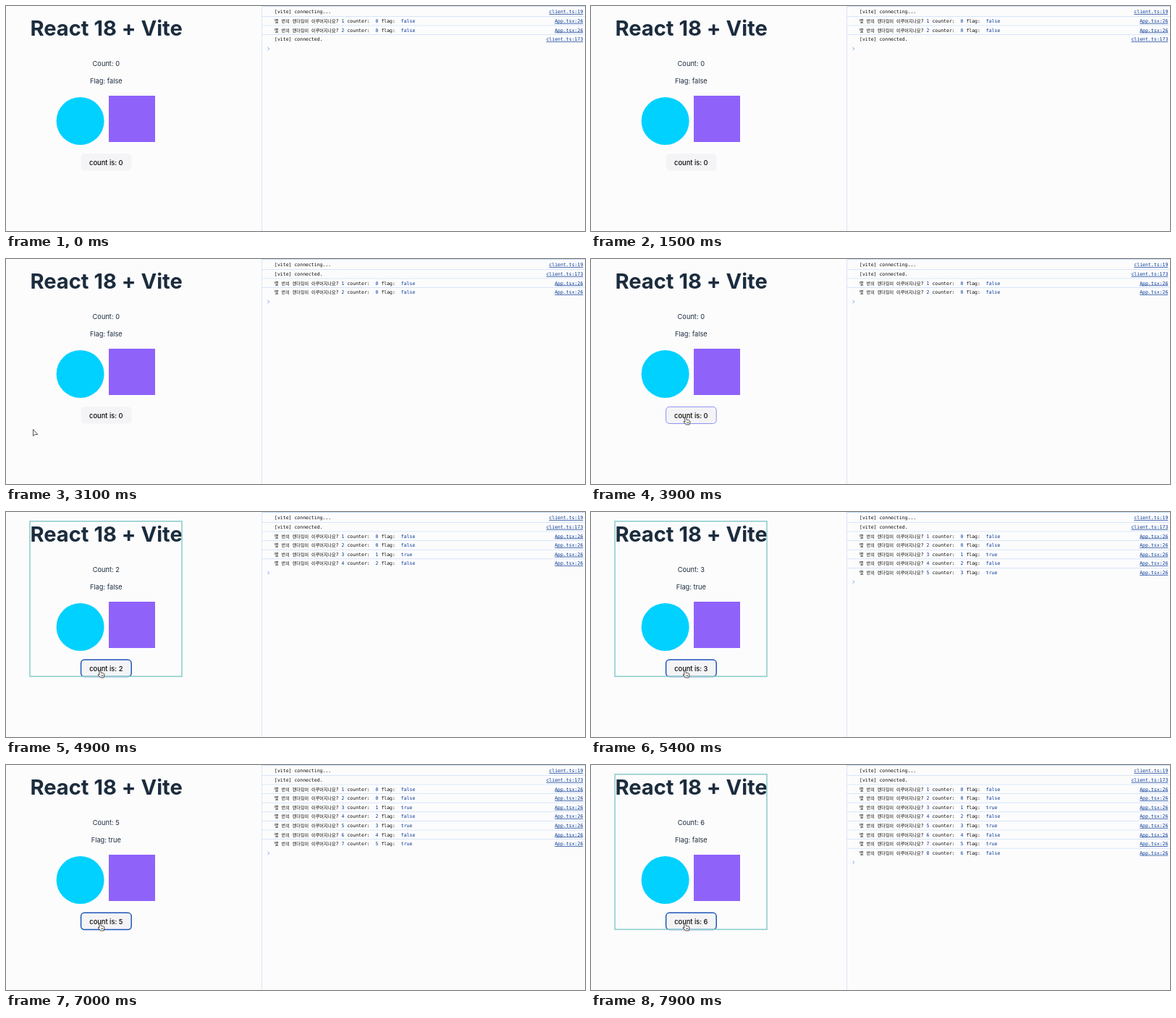
Write an HTML page with a canvas that moves like this. It is 800 by 311 pixels and loops after 8000 ms.

```html
<!DOCTYPE html>
<html lang="ko">
<head>
<meta charset="utf-8">
<title>Render counter</title>
<style>
  html, body { margin: 0; width: 100%; height: 100%; overflow: hidden; background: #fcfcfd; }
  canvas { display: block; width: 800px; height: 311px; }
</style>
</head>
<body>
<canvas id="stage"></canvas>
<script>
const W = 800, H = 311, LOOP = 8000;
const RELOAD = 2450, READY = 2600;
const CLICKS = [4200, 4900, 5250, 5600, 6300, 7900];
const FLASH = 290;
const CURSOR_IN = 2900, CURSOR_REST = 3800, NUDGE = 4700;

const UI = 'Inter, sans-serif';
const MONO = '6.5px "DejaVu Sans Mono", monospace';
const HANGUL = '6.1px "Noto Sans CJK KR", "Noto Sans CJK", sans-serif';
const INK = '#1b2c3d', LOG = '#0c0c0c', VALUE = '#063894', RULE = '#cfe0f8';
const ROW = 12.6, CELL = 3.913;

const canvas = document.getElementById('stage');
const dpr = window.devicePixelRatio || 1;
canvas.width = W * dpr;
canvas.height = H * dpr;
const ctx = canvas.getContext('2d');
ctx.scale(dpr, dpr);

function text(str, x, y, font, color, align = 'left') {
  ctx.font = font;
  ctx.fillStyle = color;
  ctx.textAlign = align;
  ctx.fillText(str, x, y);
}

function rect(x, y, w, h, color) {
  ctx.fillStyle = color;
  ctx.fillRect(x, y, w, h);
}

function link(str, y) {
  const w = str.length * CELL;
  text(str, 797.3, y, MONO, VALUE, 'right');
  rect(797.3 - w, y + 0.9, w, 0.7, VALUE);
}

function renderRow(n, counter, y) {
  let x = 371;
  for (const word of ['몇', '번의', '렌더링이', '이루어지나요']) {
    text(word, x, y, HANGUL, LOG);
    x += word.length * 5.62 + CELL;
  }
  text('?', x - CELL, y, MONO, LOG);
  const at = col => 463.6 + col * CELL;
  text(n, at(0), y, MONO, VALUE);
  text('counter:', at(2), y, MONO, LOG);
  text(counter, at(12), y, MONO, VALUE);
  text('flag:', at(14), y, MONO, LOG);
  text(counter % 2 === 1, at(21), y, MONO, VALUE);
  link('App.tsx:26', y);
}

function logRows(t, count) {
  const message = (str, src) => y => {
    text(str, 371, y, MONO, LOG);
    link(src, y);
  };
  const render = (n, counter) => y => renderRow(n, counter, y);
  const connecting = message('[vite] connecting...', 'client.ts:19');
  const connected = message('[vite] connected.', 'client.ts:173');
  const first = [render(1, 0), render(2, 0)];

  if (t < RELOAD) return [connecting, ...first, connected];
  if (t < READY) return [connecting];
  const rows = [connecting, connected, ...first];
  for (let i = 1; i <= count; i++) rows.push(render(i + 2, i));
  return rows;
}

function drawConsole(t, count) {
  rect(353, 0, 1, H, '#dbe5ef');
  rect(354, 0, W - 354, 1, '#c4dbf6');
  const rows = logRows(t, count);
  rows.forEach((row, i) => {
    if (i) rect(354, 1.4 + i * ROW, W - 354, 0.8, RULE);
    row(10.4 + i * ROW);
  });
  const y = 8.6 + rows.length * ROW;
  ctx.beginPath();
  ctx.moveTo(361.5, y - 2);
  ctx.lineTo(363.8, y);
  ctx.lineTo(361.5, y + 2);
  ctx.strokeStyle = '#6c9cec';
  ctx.lineWidth = 0.9;
  ctx.stroke();
}

function drawButton(y, count, hover) {
  ctx.beginPath();
  ctx.roundRect(103.6, y + 0.3, 69.6, 23.2, 4.7);
  ctx.fillStyle = '#f4f4f6';
  ctx.fill();
  if (count || hover) {
    ctx.strokeStyle = count ? '#1d55b8' : '#8187f2';
    ctx.lineWidth = count ? 1.5 : 0.9;
    ctx.stroke();
  }
  text('count is: ' + count, 138.3, y + 15.6, '500 9.3px ' + UI, '#080808', 'center');
}

function drawPage(t, count, hover) {
  const loading = t >= RELOAD && t < READY;
  text('React 18 + Vite', 138.6, 40.7, '700 29.1px ' + UI, INK, 'center');
  text('Count: ' + count, 138.3, 82.8, '9.25px ' + UI, INK, 'center');
  text('Flag: ' + (count % 2 === 1), 138.3, 106.7, '9.25px ' + UI, INK, 'center');
  if (!loading) {
    ctx.beginPath();
    ctx.arc(102.6, 159, 33, 0, Math.PI * 2);
    ctx.fillStyle = '#00d1ff';
    ctx.fill();
    rect(142, 124, 64, 64, '#8f62fa');
  }
  drawButton(loading ? 143 : 204, count, hover);

  if (CLICKS.some(c => t >= c && t < c + FLASH)) {
    ctx.strokeStyle = '#8acbc8';
    ctx.lineWidth = 1.5;
    ctx.strokeRect(33, 12.8, 210, 214.5);
  }
}

function drawHand() {
  ctx.beginPath();
  ctx.moveTo(-0.6, 6);
  ctx.lineTo(-1.2, 0.9);
  ctx.quadraticCurveTo(0, -0.9, 1, 0.8);
  ctx.lineTo(1.6, 3.6);
  ctx.quadraticCurveTo(4.2, 3, 6, 4.8);
  ctx.quadraticCurveTo(6.6, 7, 5.3, 10);
  ctx.lineTo(0.8, 10);
  ctx.quadraticCurveTo(-0.6, 7.8, -2.8, 6.2);
  ctx.quadraticCurveTo(-2.6, 4.6, -0.6, 6);
  ctx.closePath();
  for (const x of [2, 3.8]) {
    ctx.moveTo(x, 6.2);
    ctx.lineTo(x + 0.1, 8.4);
  }
}

function drawArrow() {
  ctx.beginPath();
  ctx.moveTo(0, 0);
  ctx.lineTo(0, 9);
  ctx.lineTo(2.2, 7.2);
  ctx.lineTo(6.2, 6.8);
  ctx.closePath();
}

function cursorAt(t) {
  const p = Math.min(1, Math.max(0, (t - CURSOR_IN) / (CURSOR_REST - CURSOR_IN)));
  const ease = p * p * (3 - 2 * p);
  const x = 24 + 106.6 * ease - (t >= NUDGE ? 0.8 : 0);
  const y = 238 - 19 * ease;
  return { x, y, hover: x > 103.5 && y < 228 };
}

function drawCursor({ x, y, hover }) {
  ctx.save();
  ctx.translate(x, y);
  if (hover) drawHand(); else drawArrow();
  ctx.fillStyle = '#fff';
  ctx.fill();
  ctx.strokeStyle = '#222';
  ctx.lineWidth = 0.8;
  ctx.stroke();
  ctx.restore();
}

function draw(now) {
  const t = now % LOOP;
  const count = CLICKS.filter(c => t >= c).length;
  const cursor = cursorAt(t);
  rect(0, 0, W, H, '#fcfcfd');
  drawPage(t, count, cursor.hover);
  drawConsole(t, count);
  if (t >= CURSOR_IN) drawCursor(cursor);
}

const start = performance.now();
function tick() {
  draw(performance.now() - start);
  requestAnimationFrame(tick);
}
tick();
</script>
</body>
</html>
```
